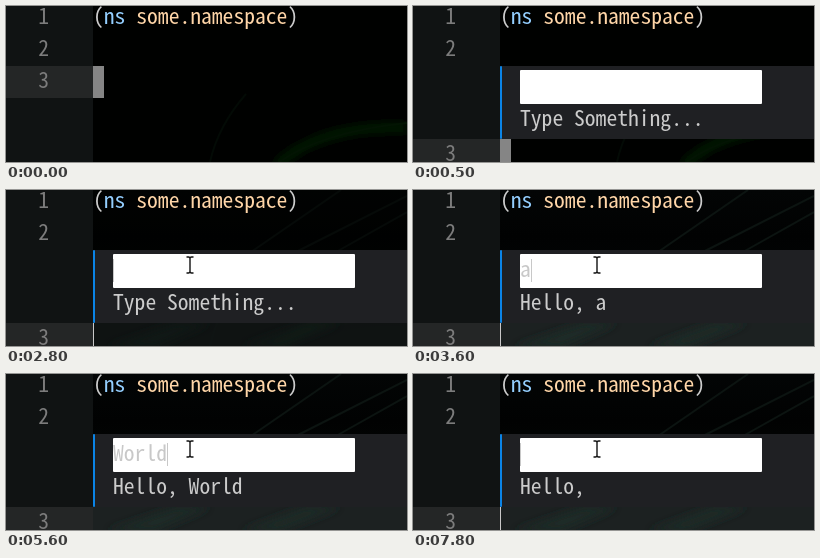
Animation, 401 px wide and 156 px high, one loop 8000 ms. Source, as an HTML page:

```html
<!DOCTYPE html>
<html lang="en">
<head>
<meta charset="utf-8">
<title>Inline input</title>
<style>
  html, body { margin: 0; width: 100%; height: 100%; overflow: hidden; background: #000; }
  svg { display: block; width: 401px; height: 156px; }
  text { font: 18px "Noto Sans Mono", "DejaVu Sans Mono", monospace; fill: #ccc; white-space: pre; }
  /* Closer letterforms, scaled to the same 0.6em cell */
  @supports (font-size-adjust: ch-width 0.6) {
    text {
      font-family: "Noto Sans Mono CJK JP", "Noto Sans Mono", "DejaVu Sans Mono", monospace;
      font-size-adjust: ch-width 0.6;
    }
  }
  .number { fill: #7c7c7c; text-anchor: end; }
  .keyword { fill: #94cfff; }
  .name { fill: #ffd6a8; }
  #typed { fill: #c8c8c8; }
</style>
</head>
<body>
<svg viewBox="0 0 401 156">
  <defs>
    <filter id="soft" x="-50%" y="-50%" width="200%" height="200%"><feGaussianBlur stdDeviation="4"/></filter>
    <linearGradient id="haze" x1="0" y1="0" x2="0" y2="1">
      <stop offset="0" stop-color="#030505"/>
      <stop offset=".3" stop-color="#010202"/>
      <stop offset="1" stop-color="#060b09"/>
    </linearGradient>
    <path id="beam" d="M-3.5-8H-1.5Q0-8 0-6.5Q0-8 1.5-8H3.5M0-6.5V6.5M-3.5 8H-1.5Q0 8 0 6.5Q0 8 1.5 8H3.5"/>
  </defs>

  <rect width="401" height="156" fill="#000100"/>
  <g id="glow" fill="none">
    <path d="M270 160Q315 118 401 122" stroke="#031f04" stroke-width="9" filter="url(#soft)"/>
    <path d="M272 157Q315 126 401 117" stroke="#031403" stroke-width="2"/>
    <path d="M204 156Q212 120 240 88" stroke="#030a05" stroke-width="2"/>
  </g>
  <g id="streaks">
    <rect width="401" height="156" fill="url(#haze)"/>
    <g stroke="#0c1411" stroke-width="2">
      <path d="M245 62L335 0M290 62L401 6M330 62L401 22"/>
    </g>
  </g>

  <rect width="87" height="156" fill="#101313"/>
  <text class="number" x="43" y="18">1</text>
  <text class="number" x="43" y="50">2</text>
  <text x="87" y="18">(<tspan class="keyword">ns</tspan> <tspan class="name">some.namespace</tspan>)</text>

  <g id="row">
    <g id="highlight">
      <rect x="87" y="60" width="314" height="32" fill="#1c2121"/>
      <path d="M100 84L170 60H205L150 84ZM235 84L300 60H335L275 84Z" fill="#1d2925" filter="url(#soft)"/>
    </g>
    <rect y="60" width="87" height="32" fill="#242626"/>
    <text class="number" x="43" y="82">3</text>
    <rect id="block" x="87" y="60" width="11" height="32" fill="#858585"/>
    <rect id="bar" x="87" y="60" width="1" height="32" fill="#c8c8c8"/>
  </g>

  <g id="panel">
    <rect x="87" y="60" width="314" height="73" fill="#1f2023"/>
    <rect x="87" y="60" width="2" height="73" rx="1" fill="#0b84e6"/>
    <g id="content">
      <rect x="107" y="64" width="242" height="34" rx="1" fill="#fff"/>
      <text id="typed" x="107" y="87"></text>
      <rect id="caret" y="69" width="1" height="23" fill="#c8c8c8"/>
      <text id="reply" x="107" y="120"></text>
    </g>
  </g>

  <g id="mouse" fill="none">
    <use href="#beam" stroke="#fff" stroke-width="3"/>
    <use href="#beam" stroke="#111" stroke-width="1.4"/>
  </g>
</svg>

<script>
  const LOOP = 8000, CELL = 10.8;
  const OPEN = 300, PANEL = 400, CONTENT = 500, FOCUS = 2800, REPLY = 3300;
  const $ = id => document.getElementById(id);
  const show = (id, on) => $(id).setAttribute("visibility", on ? "inherit" : "hidden");

  // [time, value] steps; each value holds until the next one
  const edits = [
    [1800, ""], [REPLY, "a"], [4400, ""],
    [5100, "W"], [5200, "Wo"], [5400, "Wor"], [5500, "Worl"], [5600, "World"],
    [7100, "Worl"], [7300, "Wor"], [7400, "Wo"], [7600, "W"], [7800, ""]
  ];
  const moves = [[1300, [190, 99]], [1400, [187, 86]], [1500, [184, 75]]];
  const latest = (steps, t) => steps.filter(s => s[0] <= t).pop();

  function setText(id, value) {
    const node = $(id);
    if (node.textContent !== value) node.textContent = value;
  }

  function draw(t) {
    const focused = t >= FOCUS;
    show("panel", t >= PANEL);
    show("content", t >= CONTENT);
    $("row").setAttribute("transform", `translate(0 ${t >= OPEN ? 73 : 0})`);

    const haze = !focused ? 0 : t < FOCUS + 100 ? 0.5 : 1;
    $("streaks").setAttribute("opacity", haze);
    $("highlight").setAttribute("opacity", haze);
    $("glow").setAttribute("opacity", 1 - haze);

    show("block", !focused);
    show("bar", focused && (t - FOCUS) % 800 < 400);

    const edit = latest(edits, t);
    const value = edit ? edit[1] : "";
    setText("typed", value);
    setText("reply", t < REPLY ? "Type Something..." : "Hello, " + value);
    $("caret").setAttribute("x", Math.round(107 + value.length * CELL));
    show("caret", edit && (t - edit[0]) % 1000 < 500);

    const move = latest(moves, t);
    show("mouse", move);
    if (move) $("mouse").setAttribute("transform", `translate(${move[1]})`);
  }

  function tick() {
    draw(performance.now() % LOOP);
    requestAnimationFrame(tick);
  }
  tick();
</script>
</body>
</html>
```
